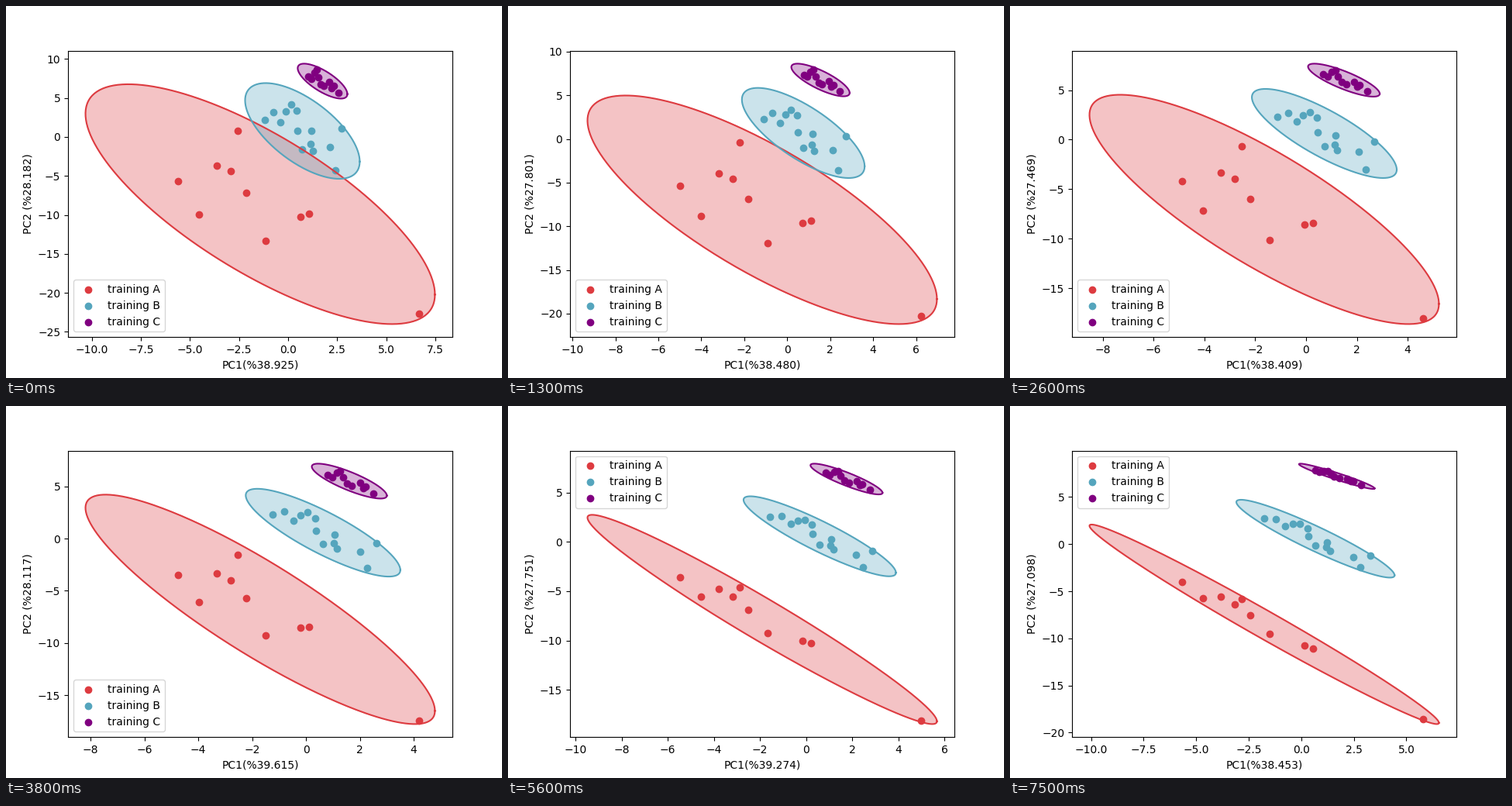
Write a matplotlib script that moves like this. It is 640x480 px and loops after 7.6 s.

```python
import matplotlib.pyplot as plt
import numpy as np
from matplotlib.animation import FuncAnimation

FRAMES = 76
KEYS = np.array([0, 13, 26, 38, 48, 65, 75])
LEGEND_FLOOR = 0.797  # bottom of an upper legend, as axes fraction

# Samples as positions inside the unit circle; each ellipse carries its own along.
LAYOUT_A = [(-.47, .25), (-.35, .53), (-.25, -.2), (-.17, -.22), (-.13, -.78),
            (-.08, -.05), (.03, .43), (.23, -.1), (.28, -.2), (.91, .35)]
LAYOUT_B = [(-.65, .25), (-.5, -.1), (-.38, .08), (-.29, -.3), (-.2, -.55), (-.1, -.47),
            (-.09, .07), (.15, -.14), (.14, .23), (0, .5), (.18, .4), (.48, .04),
            (.69, -.65), (.57, .6)]
LAYOUT_C = [(-.46, .28), (-.57, .23), (-.34, -.35), (-.24, -.7), (-.16, -.17), (-.07, .33),
            (.06, .36), (.28, -.23), (.37, .18), (.44, -.09), (.65, .28)]

theta = np.linspace(0, 2 * np.pi, 300)
CIRCLE = np.column_stack([np.cos(theta), np.sin(theta)])


def curve(t, *values):
    """Smooth curve through values at all keys, or at every second key."""
    keys = KEYS if len(values) == len(KEYS) else KEYS[::2]
    slopes = np.gradient(values, keys, edge_order=2)
    k = min(np.searchsorted(keys, t, side="right") - 1, len(keys) - 2)
    h = keys[k + 1] - keys[k]
    u = (t - keys[k]) / h
    s = u * u * (3 - 2 * u)
    return ((1 - s) * values[k] + s * values[k + 1]
            + h * u * (1 - u) * ((1 - u) * slopes[k] - u * slopes[k + 1]))


def warp(i):
    """The stretch after the fifth key moves fast, then settles."""
    a, b = KEYS[4:6]
    return b - (b - a) * ((b - i) / (b - a)) ** 3 if a < i < b else i


def ellipse_map(left, right, bottom, top, rho):
    """Map the unit circle to the falling ellipse with this box and correlation."""
    def place(uv):
        u, v = np.transpose(uv)
        x = (left + right + (right - left) * u) / 2
        y = (top + bottom - (top - bottom) * (rho * u + np.sqrt(1 - rho ** 2) * v)) / 2
        return x, y
    return place


def group_maps(t):
    floor = curve(t, -24.0, -21.2, -18.63, -17.78, -17.11, -18.67, -19.09)
    ceiling = curve(t, 9.4, 8.62, 7.67, 7.2, 7.02, 8.07, 8.54)
    a = ellipse_map(curve(t, -10.32, -9.3, -8.52, -8.19, -8.4, -9.64, -10.08),
                    curve(t, 7.48, 6.97, 5.23, 4.79, 4.88, 5.84, 6.55),
                    floor, floor + curve(t, 30.76, 23.16, 21.64, 21.17),
                    curve(t, .754, .824, .933, .9875))
    b = ellipse_map(curve(t, -2.19, -2.13, -2.39, -3.09), curve(t, 3.65, 3.57, 3.54, 4.44),
                    curve(t, -5.37, -3.88, -3.55, -3.55), curve(t, 6.91, 5.12, 4.67, 4.71),
                    curve(t, .64, .812, .873, .94))
    c = ellipse_map(curve(t, .49, .08, .32, -.11), curve(t, 3.02, 2.9, 3.13, 3.49),
                    ceiling - curve(t, 4.48, 3.33, 3.39, 2.68), ceiling,
                    curve(t, .74, .822, .841, .96))
    return a, b, c


fig, ax = plt.subplots(figsize=(6.4, 4.8), dpi=100)


def draw_group(place, layout, color, label):
    ring = place(CIRCLE)
    ax.fill(*ring, color=color, alpha=0.3, linewidth=0)
    ax.plot(*ring, color=color)
    ax.scatter(*place(layout), color=color, label=label)
    return ring


def draw(i):
    ax.cla()
    t = warp(i)
    a, b, c = group_maps(t)
    ring = draw_group(a, LAYOUT_A, "#dd3b40", "training A")
    draw_group(b, LAYOUT_B, "#55a5bd", "training B")
    draw_group(c, LAYOUT_C, "purple", "training C")
    pc1 = curve(t, 38.925, 38.480, 38.409, 39.615, 40.283, 39.077, 38.453)
    pc2 = curve(t, 28.182, 27.801, 27.469, 28.117, 28.430, 27.610, 27.098)
    ax.set_xlabel(f"PC1(%{pc1:.3f})")
    ax.set_ylabel(f"PC2 (%{pc2:.3f})")
    low, high = ax.get_ylim()
    top = (ring[1].max() - low) / (high - low)
    ax.legend(loc="upper left" if top < LEGEND_FLOOR else "lower left")


anim = FuncAnimation(fig, draw, frames=FRAMES, interval=100, repeat=True,
                     repeat_delay=0, cache_frame_data=False)
plt.show()
```
